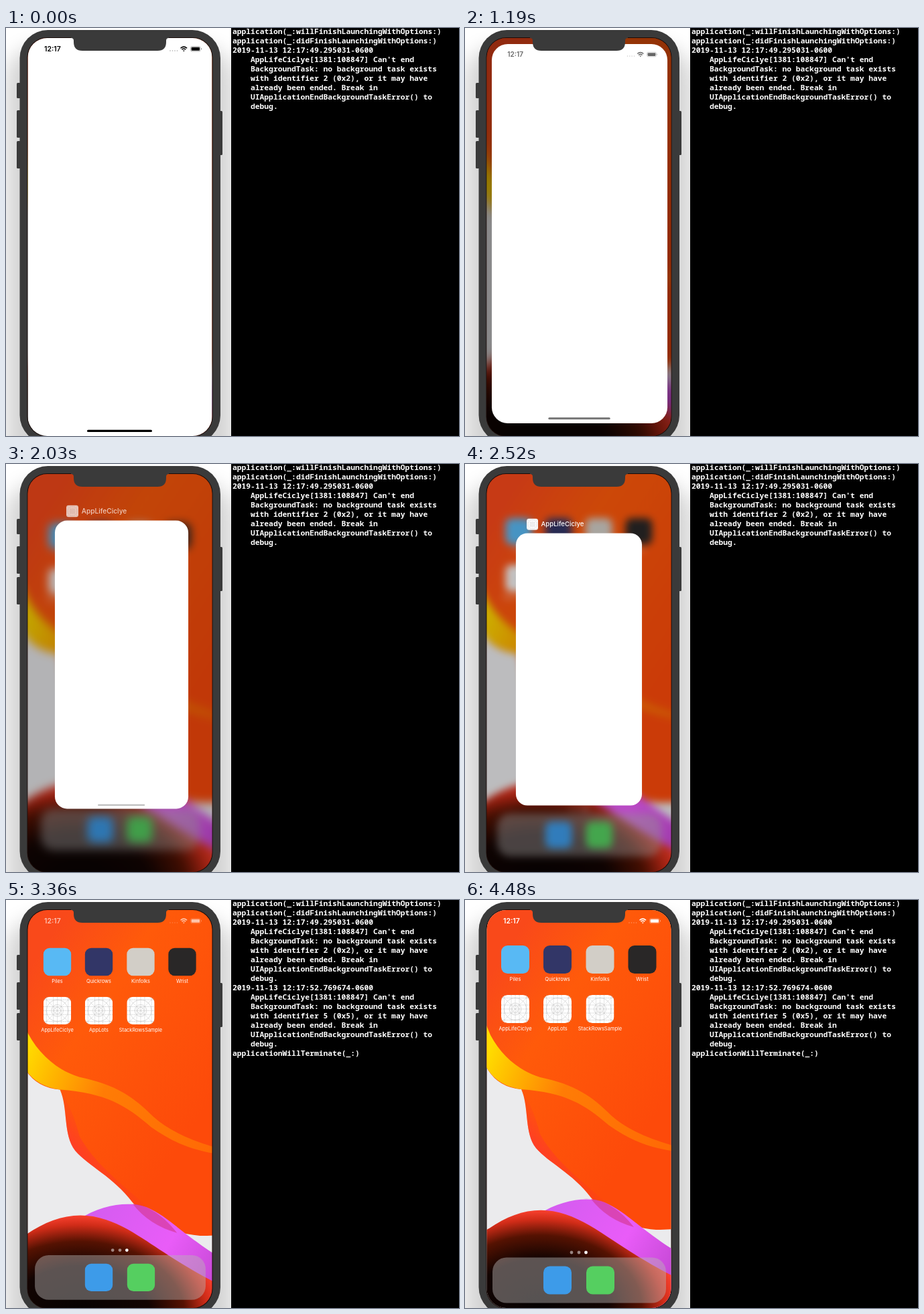
An HTML page that plays this animation: 676x610 px, repeating every 4.55 s.

```html
<!DOCTYPE html>
<html lang="en">
<head>
<meta charset="utf-8">
<title>App life cycle</title>
<style>
  html, body { margin: 0; width: 100%; height: 100%; overflow: hidden; background: #000; }
  svg { display: block; width: 676px; height: 610px; }
  text { font-family: Inter, "Open Sans", sans-serif; }
  .console text { font: 700 11.3px "Noto Sans Mono", "DejaVu Sans Mono", monospace; fill: #fff; }
  .label { font-size: 7.5px; fill: #fff; text-anchor: middle; }
  .clock { font-size: 10.5px; font-weight: 600; }
</style>
</head>
<body>
<svg viewBox="0 0 676 610">
  <defs>
    <clipPath id="screen"><rect x="32.5" y="15" width="275" height="595" rx="29"/></clipPath>
    <filter id="soft" x="-30%" y="-30%" width="160%" height="160%"><feGaussianBlur stdDeviation="15"/></filter>
    <linearGradient id="orange" gradientUnits="userSpaceOnUse" x1="32" y1="120" x2="300" y2="300">
      <stop offset="0" stop-color="#f9491a"/><stop offset=".35" stop-color="#ff5a0a"/><stop offset="1" stop-color="#fd4a0a"/>
    </linearGradient>
    <linearGradient id="band" gradientUnits="userSpaceOnUse" x1="32" y1="235" x2="308" y2="345">
      <stop offset="0" stop-color="#ffdc00"/><stop offset=".17" stop-color="#ffb400"/>
      <stop offset=".42" stop-color="#ff7c05"/><stop offset="1" stop-color="#ff6a05"/>
    </linearGradient>
    <linearGradient id="rim" gradientUnits="userSpaceOnUse" x1="85" y1="400" x2="145" y2="355">
      <stop offset="0" stop-color="#ff2b4a"/><stop offset="1" stop-color="#ff2b30" stop-opacity="0"/>
    </linearGradient>
    <linearGradient id="purple" gradientUnits="userSpaceOnUse" x1="130" y1="455" x2="300" y2="560">
      <stop offset="0" stop-color="#d45cf0"/><stop offset=".6" stop-color="#e95cf8"/><stop offset="1" stop-color="#c84ad8"/>
    </linearGradient>
    <radialGradient id="hill" gradientUnits="userSpaceOnUse" cx="0" cy="0" r="1"
      gradientTransform="translate(112 610) scale(205 147)">
      <stop offset="0" stop-color="#050202"/><stop offset=".5" stop-color="#120402"/>
      <stop offset=".74" stop-color="#551202"/><stop offset=".9" stop-color="#d02c18"/><stop offset="1" stop-color="#fb4230"/>
    </radialGradient>
    <symbol id="blank" viewBox="0 0 42 42">
      <rect width="42" height="42" rx="9.5" fill="#fff"/>
      <g fill="none" stroke="#bdbdbd" stroke-width=".55">
        <path d="M0 4.5H42M0 15H42M0 21H42M0 27H42M0 37.5H42M4.5 0V42M15 0V42M21 0V42M27 0V42M37.5 0V42M2 2 40 40M40 2 2 40" stroke-dasharray="2 .7"/>
        <circle cx="21" cy="21" r="5"/><circle cx="21" cy="21" r="9"/><circle cx="21" cy="21" r="16.5"/>
      </g>
    </symbol>
    <symbol id="status" viewBox="0 0 340 60">
      <text class="clock" x="57" y="35">12:17</text>
      <g opacity=".35"><circle cx="245" cy="34" r=".8"/><circle cx="248.5" cy="34" r=".8"/><circle cx="252" cy="34" r=".8"/><circle cx="255.5" cy="34" r=".8"/></g>
      <path d="M260.5 30.2q4.8-4.2 9.6 0M262.4 32.2q2.9-2.3 5.8 0" fill="none" stroke="currentColor" stroke-width="1.5"/>
      <path d="M263.7 33.4h3.2l-1.6 1.9z"/>
      <rect x="275.5" y="27.7" width="14.6" height="7.2" rx="2" fill="none" stroke="currentColor" stroke-width=".6" opacity=".5"/>
      <rect x="276.6" y="28.8" width="12.4" height="5" rx="1.1"/>
      <path d="M291 30v2.6q1-.3 1-1.3t-1-1.3" opacity=".5"/>
    </symbol>
  </defs>

  <rect width="336" height="610" fill="#fff"/>
  <rect x="0" y="28" width="340" height="700" rx="50" opacity=".17" filter="url(#soft)"/>
  <g fill="#3a3a3a">
    <rect x="16" y="82" width="7" height="23" rx="1.5"/>
    <rect x="16" y="123" width="7" height="41" rx="1.5"/>
    <rect x="16" y="169" width="7" height="41" rx="1.5"/>
    <rect x="317" y="124" width="6" height="66" rx="1.5"/>
    <rect x="20.5" y="3" width="299.5" height="618" rx="42"/>
  </g>
  <rect x="31.5" y="14" width="277" height="597" rx="30" fill="#1a0b08"/>

  <g clip-path="url(#screen)">
    <g id="home">
      <g id="wallpaper">
        <rect x="-30" y="-40" width="400" height="720" fill="#ebebed"/>
        <path id="lobe" fill="url(#orange)" d="M-30-40H370V486C330 490 315 493 285 493C245 490 215 475 188 445C160 408 125 393 106 371C88 348 96 310 84 283Q48 280 32 250L-30 170Z"/>
        <path fill="url(#rim)" d="M84 283C96 310 88 348 106 371C125 393 160 408 188 445C205 464 225 480 250 488C190 430 140 400 112 350Q102 310 84 283"/>
        <path fill="url(#band)" d="M-30 120C15 140 28 178 38 202C55 234 82 256 112 265C165 276 190 294 218 322Q262 362 370 380C300 378 262 370 215 337C178 305 150 288 84 283Q48 278 32 250L-30 165Z"/>
        <path fill="url(#purple)" d="M110 470C145 447 185 443 208 452C250 470 268 505 370 556V680H120Z"/>
        <path fill="#d4358c" opacity=".6" d="M176 447Q194 446 208 452C228 462 240 474 252 489Q212 478 188 447Z"/>
        <path fill="url(#hill)" d="M-30 540C5 515 20 499 36 491C72 466 110 456 150 470C205 488 240 535 370 590V680H-30Z"/>
      </g>
      <g id="icons"></g>
      <use id="homeStatus" href="#status" width="340" height="60" fill="#fff" color="#fff"/>
    </g>
    <rect id="dim" width="336" height="620"/>
    <g id="card">
      <rect x="32.5" y="15" width="275" height="595" rx="25" fill="#fff"/>
      <use id="cardStatus" href="#status" width="340" height="60"/>
      <rect id="indicator" x="121" y="600.8" width="97" height="3.2" rx="1.6"/>
      <g id="title">
        <use href="#blank" x="56" y="-17" width="25" height="25"/>
        <text x="87.5" y="0" font-size="14" font-weight="500" fill="#fff">AppLifeCiclye</text>
      </g>
    </g>
  </g>
  <path fill="#3a3a3a" d="M97 13v2q4 0 4 4v2q0 13 13 13h112q13 0 13-13v-2q0-4 4-4v-2z"/>

  <rect x="336" width="340" height="610"/>
  <g class="console" id="console"></g>
</svg>

<script>
const LOOP = 4550, STEP = 70;
const $ = id => document.getElementById(id);

// Home screen
const tile = (x, y, color) => color
  ? `<rect x="${x - 21}" y="${y - 21}" width="42" height="42" rx="9.5" fill="${color}"/>`
  : `<use href="#blank" x="${x - 21}" y="${y - 21}" width="42" height="42"/>`;
const columns = [75, 138, 201.5, 264.5];
const rows = [
  { y: 89, apps: [["Piles", "#58b9f4"], ["Quickrows", "#323667"], ["Kinfolks", "#d2cec7"], ["Wrist", "#292727"]] },
  { y: 163, apps: [["AppLifeCiclye"], ["AppLots"], ["StackRowsSample"]] }
];
$("icons").innerHTML =
  rows.map(({ y, apps }) => apps.map(([name, color], i) =>
    tile(columns[i], y, color) + `<text class="label" x="${columns[i]}" y="${y + 32}">${name}</text>`).join("")).join("") +
  [159, 170, 180.5].map((x, i) => `<circle cx="${x}" cy="527" r="2.4" fill="#fff" opacity="${i < 2 ? .5 : 1}"/>`).join("") +
  `<rect x="41" y="534.5" width="259" height="68" rx="21" fill="#b9b4b4" opacity=".45"/>` +
  tile(138, 568.5, "#3d9be9") + tile(202, 568.5, "#55cf60");

// Console
const warning = (time, id) => [
  `2019-11-13 12:17:${time}-0600`,
  "\tAppLifeCiclye[1381:108847] Can't end",
  "\tBackgroundTask: no background task exists",
  `\twith identifier ${id} (0x${id}), or it may have`,
  "\talready been ended. Break in",
  "\tUIApplicationEndBackgroundTaskError() to",
  "\tdebug."
];
const log = [
  [0, ["application(_:willFinishLaunchingWithOptions:)", "application(_:didFinishLaunchingWithOptions:)", ...warning("49.295031", 2)]],
  [3080, warning("52.769674", 5)],
  [3220, ["applicationWillTerminate(_:)"]]
];
const lines = log.flatMap(([time, texts]) => texts.map(text => ({ time, text })));
$("console").innerHTML = lines.map(({ text }, i) =>
  `<text x="${text[0] === "\t" ? 365 : 338}" y="${9 + 14 * i}">${text.trim()}</text>`).join("");
const lineNodes = [...$("console").children];

// Motion: [time, value] points
const tracks = {
  cardX: [[1050, 170], [1190, 171], [2030, 172.5], [2310, 170.3], [2520, 170]],
  cardY: [[980, 312.5], [1190, 307.5], [2030, 300], [2310, 306], [2520, 307], [2660, 306], [2800, 240], [2940, 40], [3080, -260]],
  cardScale: [[980, 1], [1190, .953], [1540, .85], [1820, .765], [2030, .724], [2310, .69], [2520, .684]],
  cardStatus: [[1050, 1], [1190, .6], [1400, 0]],
  indicator: [[1050, 1], [1190, .55], [2030, .25], [2240, 0]],
  title: [[1680, 0], [2030, .72], [2310, 1]],
  dim: [[980, .7], [1190, .42], [1540, .33], [2030, .24], [2520, .2], [3150, .2], [3290, .05], [3360, 0]],
  blur: [[1190, 9], [2030, 7], [2520, 6], [3150, 6], [3220, 4], [3290, 1.8], [3360, .6], [3500, 0]],
  iconScale: [[1190, .89], [2030, .915], [2310, .945], [3150, .95], [3220, .96], [3360, .984], [3500, .994], [3780, 1]],
  wallScale: [[3150, 1.06], [3360, 1.04], [3570, 1.018], [3850, 1.005], [4340, 1]],
  homeStatus: [[3220, 0], [3360, .65], [3570, 1]]
};
function at(name, t) {
  const points = tracks[name];
  const next = points.findIndex(p => p[0] > t);
  if (next === 0) return points[0][1];
  if (next < 0) return points[points.length - 1][1];
  const [t0, a] = points[next - 1], [t1, b] = points[next];
  return a + (b - a) * (t - t0) / (t1 - t0);
}

const place = (id, x, y, scale, ox, oy) =>
  $(id).setAttribute("transform", `translate(${x} ${y}) scale(${scale}) translate(${-ox} ${-oy})`);

function draw(t) {
  place("card", at("cardX", t), at("cardY", t), at("cardScale", t), 170, 312.5);
  place("icons", 170, 310, at("iconScale", t), 170, 310);
  place("wallpaper", 170, 270, at("wallScale", t), 170, 270);
  for (const id of ["cardStatus", "indicator", "title", "dim", "homeStatus"])
    $(id).style.opacity = at(id, t);
  const blur = at("blur", t);
  $("home").style.filter = blur ? `blur(${blur}px)` : "none";
  lines.forEach(({ time }, i) => { lineNodes[i].style.display = t >= time ? "" : "none"; });
}

const start = performance.now();
function tick() {
  const t = (performance.now() - start) % LOOP;
  draw(Math.floor(t / STEP) * STEP);
  requestAnimationFrame(tick);
}
tick();
</script>
</body>
</html>
```
